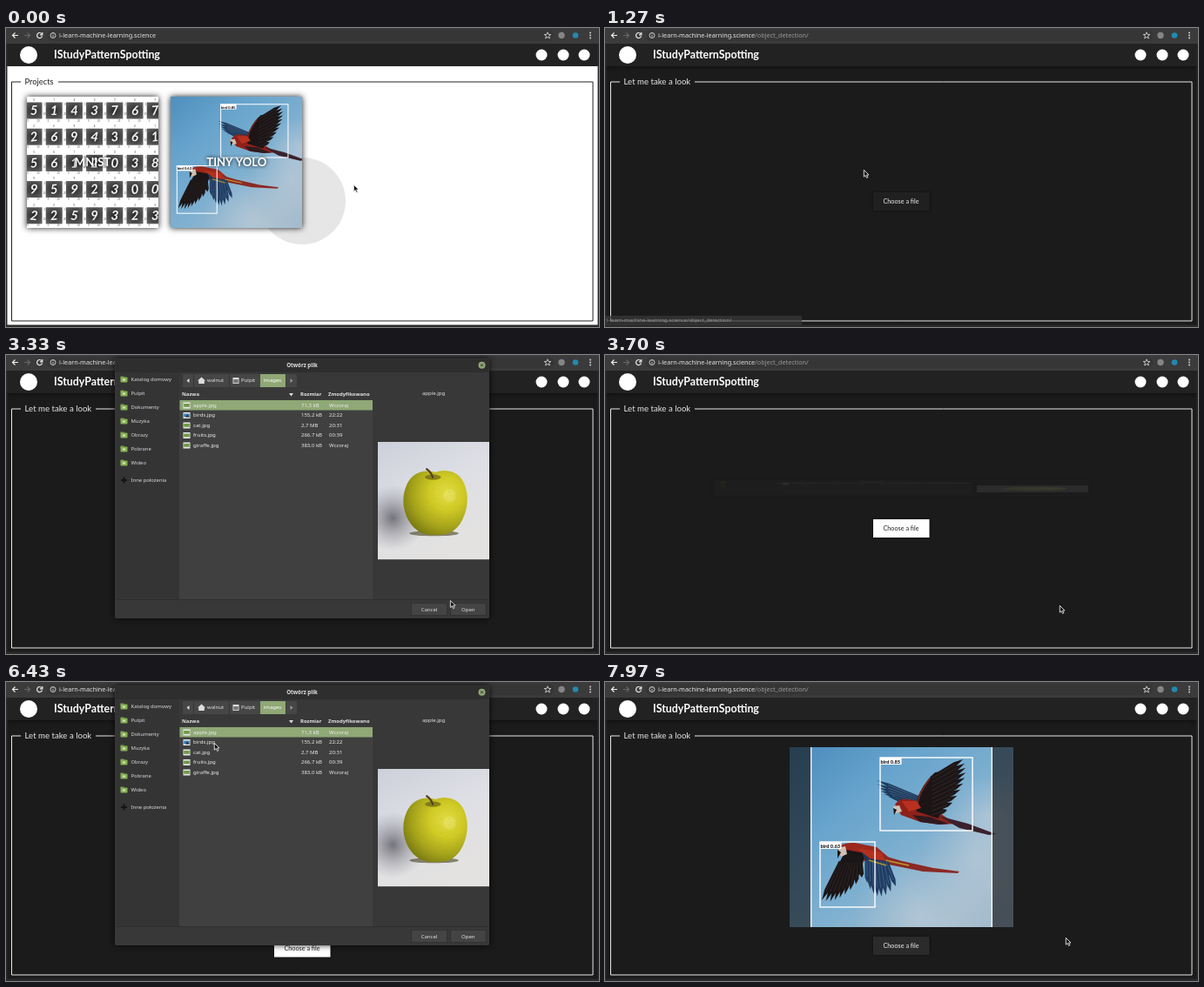
Recreate the animation shown at these times as an HTML page with a canvas. Size 681 by 344 pixels, loop 8 s.

```html
<!DOCTYPE html>
<html lang="en">
<head>
<meta charset="utf-8">
<title>Object detection demo</title>
<style>
html, body { margin: 0; width: 100%; height: 100%; overflow: hidden; background: #1b1b1b; }
canvas { display: block; }
</style>
</head>
<body>
<canvas id="stage" width="681" height="344"></canvas>
<script>
const ctx = document.getElementById('stage').getContext('2d');
const LOOP = 8000;
const LATO = 'Lato, sans-serif';
const NOTO = '"Noto Sans", sans-serif';
const GREEN = '#8fa876';

const clamp = v => Math.max(0, Math.min(1, v));
const ramp = (t, a, b) => clamp((t - a) / (b - a));
const ease = u => u * u * (3 - 2 * u);
const mix = (a, b, u) => a + (b - a) * u;
const grey = v => `rgb(${v},${v},${v})`;

function rect(x, y, w, h, color) {
  ctx.fillStyle = color;
  ctx.fillRect(x, y, w, h);
}
function rounded(x, y, w, h, r, color) {
  ctx.fillStyle = color;
  ctx.beginPath();
  ctx.roundRect(x, y, w, h, r);
  ctx.fill();
}
function oval(x, y, rx, ry, color) {
  ctx.fillStyle = color;
  ctx.beginPath();
  ctx.ellipse(x, y, rx, ry, 0, 0, Math.PI * 2);
  ctx.fill();
}
function disc(x, y, r, color) { oval(x, y, r, r, color); }
function shape(d, color) {
  ctx.fillStyle = color;
  ctx.fill(new Path2D(d));
}
function stroke(d, color, width = 1) {
  ctx.strokeStyle = color;
  ctx.lineWidth = width;
  ctx.stroke(new Path2D(d));
}
function text(s, x, y, size, color, { font = NOTO, weight = 400, align = 'left' } = {}) {
  ctx.font = `${weight} ${size}px ${font}`;
  ctx.textAlign = align;
  ctx.textBaseline = 'middle';
  ctx.fillStyle = color;
  ctx.fillText(s, x, y);
}
function withShadow(color, blur, draw) {
  ctx.save();
  ctx.shadowColor = color;
  ctx.shadowBlur = blur;
  draw();
  ctx.restore();
}
function withStops(g, colors) {
  colors.forEach((c, i) => g.addColorStop(i / (colors.length - 1), c));
  return g;
}
function gradient(x0, y0, x1, y1, ...colors) {
  return withStops(ctx.createLinearGradient(x0, y0, x1, y1), colors);
}
function radial(x, y, r, ...colors) {
  return withStops(ctx.createRadialGradient(x, y, 0, x, y, r), colors);
}
function local(x, y, scale, draw) {
  ctx.save();
  ctx.translate(x, y);
  ctx.scale(scale, scale);
  draw();
  ctx.restore();
}
function clipTo(x, y, w, h) {
  ctx.beginPath();
  ctx.rect(x, y, w, h);
  ctx.clip();
}

// Pictures

function detection(label, x, y, w, h, labelWidth) {
  ctx.strokeStyle = '#fff';
  ctx.lineWidth = 1.4;
  ctx.strokeRect(x, y, w, h);
  rect(x, y, labelWidth, 8, '#fff');
  text(label, x + .5, y + 4.8, 5.7, '#000', { font: LATO, weight: 700 });
}

function paintApple() {
  clipTo(0, 0, 208, 220);
  rect(0, 0, 208, 220, gradient(0, 0, 120, 220, '#cdd0da', '#dedfe5', '#e4e2e0'));
  rect(-50, 60, 160, 160, radial(28, 142, 62, 'rgba(60,58,66,.65)', 'rgba(90,90,98,.32)', 'rgba(120,120,130,0)'));
  oval(105, 171, 46, 5, 'rgba(70,65,30,.6)');
  shape('M107 57C124 50 148 54 158 72C172 96 169 130 153 154C140 172 124 175 107 174C86 176 68 166 58 148C44 124 44 92 60 70C72 54 93 52 107 57Z',
    radial(128, 96, 96, '#e2dc45', '#d0ca25', '#a5a31b', '#6b6c10'));
  oval(103, 66, 15, 5, 'rgba(80,75,10,.55)');
  stroke('M103 68Q100 56 90 50', '#594022', 3.4);
  oval(134, 101, 12, 12, 'rgba(240,236,150,.28)');
  for (let i = 0; i < 34; i++) {
    const a = i * 2.4, r = 8.2 * Math.sqrt(i);
    disc(108 + r * Math.cos(a), 118 + r * Math.sin(a), .6, 'rgba(150,105,20,.55)');
  }
}

// Feathers run from the line a-b to tips along the curve p-q-r.
function feathers(count, [ax, ay], [bx, by], [px, py], [qx, qy], [rx, ry], width, color, edge) {
  const curve = (p, q, r, u) => mix(mix(p, q, u), mix(q, r, u), u);
  for (let i = 0; i < count; i++) {
    const u = i / (count - 1);
    const x = mix(ax, bx, u), y = mix(ay, by, u);
    const tx = curve(px, qx, rx, u), ty = curve(py, qy, ry, u);
    const len = Math.hypot(tx - x, ty - y);
    const nx = (y - ty) / len * width, ny = (tx - x) / len * width;
    const mx = mix(x, tx, .75), my = mix(y, ty, .75);
    shape(`M${x + nx} ${y + ny}L${mx + nx} ${my + ny}L${tx} ${ty}L${mx - nx} ${my - ny}L${x - nx} ${y - ny}Z`, color);
    stroke(`M${x} ${y}L${mx} ${my}`, edge, .5);
  }
}

function paintBirds() {
  clipTo(-25, 0, 257, 207);
  rect(-25, 0, 257, 207, gradient(-25, 0, 150, 207, '#4a8abb', '#66a3cc', '#7fb0d0', '#a4bccd'));
  [[190, 130, 65], [125, 195, 75], [205, 80, 50]].forEach(([x, y, r]) =>
    rect(-25, 0, 257, 207, radial(x, y, r, 'rgba(196,208,219,.55)', 'rgba(190,205,218,0)')));

  shape('M126 60Q112 54 96 50L103 64L118 68Z', '#1d3655');
  feathers(8, [128, 60], [118, 67], [75, 38], [74, 54], [102, 62], 1.9, '#1e3a5c', '#6f95b5');
  shape('M96 66Q101 58 112 60L132 64L152 79L166 88L147 89L125 86L103 78Z', '#8f211a');
  shape('M116 78L135 80L158 88L147 89L125 86Z', '#2e1a20');
  shape('M146 79L180 88L212 100L204 101L170 93Z', '#3b222c');
  shape('M121 74C118 60 128 42 142 29L150 28L152 62L146 82Z', '#1b1516');
  feathers(10, [138, 36], [138, 78], [174, 14], [186, 34], [156, 72], 2.6, '#1b1516', '#4a3834');
  stroke('M121 70Q122 54 136 36', '#722319', 2);
  shape('M104 62L121 62L126 70L112 74Z', '#b8301f');
  shape('M94 68L101 67L104 74L97 76L94 74Z', '#cfc0b2');
  shape('M94 70L98 72L95 78Z', '#171310');

  shape('M30 117Q35 109 50 110L75 115L89 127L70 134L42 125Z', '#9c271c');
  shape('M80 124L104 131L140 139L170 143L168 145L128 143L84 134Z', '#8a2a24');
  stroke('M80 129L112 136', '#c09a2c', 1.6);
  shape('M40 118L62 122L56 146L38 150L24 148Z', '#1a1516');
  feathers(9, [34, 132], [56, 132], [12, 176], [30, 184], [58, 150], 2.6, '#1a1516', '#44342f');
  shape('M58 121L84 127L92 146L70 152Z', '#1e3556');
  feathers(8, [64, 130], [86, 132], [64, 156], [76, 186], [97, 160], 2.5, '#203c62', '#587da3');
  shape('M52 116L80 121L86 131L67 128Z', '#b3301e');
  stroke('M66 130L86 136', '#b08f2c', 1.6);
  shape('M30 116L39 114L41 123L34 126Z', '#cfc0b2');
  shape('M30 118L34 121L30 128Z', '#171310');
}

function birdBoxes() {
  detection('bird 0.85', 79, 12, 106, 84, 24.5);
  detection('bird 0.63', 10, 109, 63, 75, 24.5);
}

// Browser and page

function browserBar(onDetector) {
  rect(0, 0, 681, 18, '#3b3b3b');
  rounded(47, 2, 582, 13, 6, '#363636');
  stroke('M14 8.5H7.5M10.5 5.5L7.5 8.5L10.5 11.5', '#eee', 1.2);
  stroke('M21 8.5H27.5M24.5 5.5L27.5 8.5L24.5 11.5', '#666', 1.2);
  stroke('M41 6.7A3 3 0 1 0 41.5 9.3M41.8 5V7.8H39', '#eee', 1.2);
  stroke('M57 8.5A3 3 0 1 1 51 8.5A3 3 0 1 1 57 8.5M54 8V10.3M54 6.4V7.2', '#ddd', .9);
  const host = 'i-learn-machine-learning.science';
  text(host, 61, 8.7, 7.27, '#e6e6e6');
  if (onDetector) text('/object_detection/', 61 + ctx.measureText(host).width, 8.7, 7.27, '#9a9a9a');
  stroke('M622 4.8L623 7.4L625.8 7.5L623.6 9.2L624.4 12L622 10.4L619.6 12L620.4 9.2L618.2 7.5L621 7.4Z', '#ddd', .8);
  disc(638, 8.5, 3.7, '#858585');
  disc(654, 8.5, 3.3, '#2389ae');
  [5.5, 8.5, 11.5].forEach(y => disc(671, y, .9, '#ddd'));
}

function pageHeader(dark) {
  withShadow(`rgba(0,0,0,${.7 * dark})`, 6, () => rect(0, 18, 681, 26, '#222'));
  disc(26, 31, 10, '#fff');
  text('IStudyPatternSpotting', 55, 31.3, 12.4, '#fff', { font: LATO, weight: 700 });
  [615, 640, 664].forEach(x => disc(x, 31, 6.5, '#fff'));
}

function fieldset(legend, gapEnd, size, color) {
  stroke(`M17 62H6.5V337H674V62H${gapEnd}`, color);
  text(legend, 21.5, 62.3, size, color, { font: LATO });
}

function tileTitle(s, x) {
  withShadow('#000', 4, () => text(s, x, 155, 13.1, '#fff', { font: LATO, weight: 700, align: 'center' }));
}

function digitSheet() {
  ctx.save();
  clipTo(24, 79, 151, 151);
  rect(24, 79, 151, 151, '#fff');
  ['5143767', '2694361', '5612038', '9592300', '2259323'].forEach((row, j) => {
    [...row].forEach((digit, i) => {
      const x = 22.5 + 23.2 * i, y = 85.5 + 30.2 * j;
      rect(x, y, 19, 19, radial(x + 9.5, y + 9.5, 14, '#262626', '#6a6a6a'));
      ctx.save();
      ctx.translate(x + 9.5, y + 10);
      ctx.rotate(.12 * Math.sin(i * 3 + j * 5));
      text(digit, 0, 0, 15, '#f4f4f4', { font: LATO, weight: 'italic 700', align: 'center' });
      ctx.restore();
      text(digit, x + 9.5, y - 2.6, 3, '#333', { align: 'center' });
      text('0', x + 2, y + 21.3, 2.6, '#555');
      text('20', x + 13, y + 21.3, 2.6, '#555');
      text('0', x - 2, y + 3, 2.6, '#555');
      text('20', x - 3, y + 14, 2.6, '#555');
    });
  });
  ctx.restore();
}

function projectsPage() {
  rect(0, 18, 681, 326, '#fff');
  disc(340, 199, 50, '#e6e6e6');
  fieldset('Projects', 60, 9.4, '#222');
  [24, 189].forEach(x => withShadow('rgba(0,0,0,.9)', 7, () => rect(x, 79, 151, 151, '#555')));
  digitSheet();
  ctx.save();
  clipTo(189, 79, 151, 151);
  local(189, 79, 151 / 207, () => { paintBirds(); birdBoxes(); });
  ctx.restore();
  tileTitle('MNIST', 99.5);
  tileTitle('TINY YOLO', 264.8);
}

function chooseButton(y, white) {
  withShadow('rgba(0,0,0,.5)', 3, () => rect(308, y, 64.5, 21, grey(32 + 223 * white)));
  text('Choose a file', 340, y + 11, 7.25, white > .5 ? '#222' : '#f2f2f2', { font: LATO, align: 'center' });
}

function appleResult(boxed) {
  local(236, 72, 1, () => {
    paintApple();
    rect(0, 0, 208, 220, 'rgba(0,0,0,.18)');
    rect(0, 0, 208, 5.5, 'rgba(25,25,25,.72)');
    rect(0, 214.5, 208, 6, 'rgba(25,25,25,.72)');
    stroke('M0 6H208M0 214H208', '#fff', 1.3);
    if (boxed) detection('apple 0.73', 33, 51, 149, 127, 29);
  });
}

function birdsResult(boxed) {
  local(237, 75, 1, () => {
    paintBirds();
    rect(-25, 0, 25, 207, 'rgba(20,22,25,.65)');
    rect(207, 0, 25, 207, 'rgba(20,22,25,.65)');
    stroke('M-.3 0V207M207.3 0V207', '#fff', 1.3);
    if (boxed) birdBoxes();
  });
}

function detectorPage(t) {
  rect(0, 18, 681, 326, '#1b1b1b');
  fieldset('Let me take a look', 103, 9.65, '#e8e8e8');
  if (t < 4130) return chooseButton(189, ramp(t, 1750, 1930));
  if (t < 7900) {
    appleResult(t >= 4400);
    const white = t < 5000 ? 1 - ramp(t, 4130, 4300) : ramp(t, 5300, 5450);
    return chooseButton(295.5, white);
  }
  birdsResult(t >= 7960);
  chooseButton(293, t < 7960 ? .5 : .05);
}

function statusBar(alpha) {
  ctx.globalAlpha = alpha;
  rect(0, 331, 226, 11, '#383838');
  text('i-learn-machine-learning.science/object_detection/', 2, 336.7, 6.04, '#b5b5b5');
  ctx.globalAlpha = 1;
}

function windowEdge() {
  rect(0, 18, 1.5, 326, '#2a2a2a');
  rect(679.5, 18, 1.5, 326, '#2a2a2a');
  rect(0, 341.5, 681, 2.5, '#2a2a2a');
}

// File dialog

const PLACES = ['Katalog domowy', 'Pulpit', 'Dokumenty', 'Muzyka', 'Obrazy', 'Pobrane', 'Wideo'];
const FILES = [
  ['apple.jpg', '71,3 kB', 'Wczoraj'],
  ['birds.jpg', '155,2 kB', '22:22'],
  ['cat.jpg', '2,7 MB', '20:31'],
  ['fruits.jpg', '266,7 kB', '00:39'],
  ['giraffe.jpg', '383,0 kB', 'Wczoraj'],
];

function dialogButton(label, x, w) {
  rounded(x, 285, w, 15, 1.5, '#2c2c2c');
  rounded(x + .7, 285.7, w - 1.4, 13.6, 1, '#444');
  text(label, x + w / 2, 292.8, 6, '#e4e4e4', { align: 'center' });
}

function pathBar() {
  rounded(203, 22, 131, 15, 1.5, '#464646');
  rect(291, 22, 30.5, 15, GREEN);
  [215, 256, 291, 321].forEach(x => rect(x, 22, .8, 15, '#303030'));
  shape('M210.5 27L207.5 29.5L210.5 32Z', '#ddd');
  shape('M326.5 27L329.5 29.5L326.5 32Z', '#999');
  shape('M220 29.5L224.5 25.5L229 29.5H227.8V33H221.2V29.5Z', '#ddd');
  text('walnut', 231, 29.7, 6, '#e4e4e4');
  rect(260.5, 26, 7, 7, '#ddd');
  rect(261.3, 28, 5.4, 4.2, '#777');
  text('Pulpit', 270, 29.7, 6, '#e4e4e4');
  text('images', 306, 29.7, 6, '#fff', { align: 'center' });
}

function fileList(selected) {
  rect(199, 39, 222, 242, '#404040');
  rect(199, 39, 222, 12.5, '#383838');
  [['Nazwa', 202], ['Rozmiar', 338], ['Zmodyfikowano', 370]].forEach(([s, x]) =>
    text(s, x, 45.7, 5.95, '#e4e4e4', { weight: 700 }));
  shape('M325 44H330L327.5 47.5Z', '#ddd');
  rect(199.5, 52 + 11.5 * selected, 221.5, 11.5, GREEN);
  FILES.forEach(([name, size, date], i) => {
    const y = 58 + 11.5 * i;
    rect(203.5, y - 3.5, 8, 7, '#e8e8e8');
    rect(204.2, y - 2, 6.6, 3.8, i === 1 ? '#3b82b8' : '#6f9a43');
    if (i === 1) shape(`M206 ${y + 2}L208 ${y - 1}L211 ${y + 2}Z`, '#26394a');
    text(name, 215, y + .2, 6.1, '#ececec');
    text(size, 339, y + .2, 6, '#ececec');
    text(date, 371, y + .2, 6, '#ececec');
  });
}

function fileDialog(selected) {
  withShadow('rgba(0,0,0,.8)', 7, () => rounded(125, 4, 430, 299, 2, '#383838'));
  rounded(125.5, 4.5, 429, 15.5, 2, '#2e2e2e');
  text('Otwórz plik', 340, 12.3, 6.2, '#e4e4e4', { weight: 700, align: 'center' });
  disc(546.5, 11.7, 4, GREEN);
  stroke('M545 10.2L548 13.2M548 10.2L545 13.2', '#2e2e2e', 1);
  rect(126, 20, 73, 261, '#343434');
  PLACES.forEach((name, i) => {
    const y = 28 + 16 * i;
    rect(131.5, y - 3.5, 4, 2, '#6f9a43');
    rounded(131.5, y - 2.5, 8, 6, .8, '#86b052');
    rect(134, y - .5, 3, 2, '#d8e6c4');
    text(name, 143.5, y + .2, 5.9, '#dcdcdc');
  });
  stroke('M132 144H139M135.5 140.5V147.5', '#151515', 2.2);
  text('Inne położenia', 143.5, 144.2, 5.9, '#dcdcdc');
  pathBar();
  fileList(selected);
  text(FILES[selected][0], 491, 44.2, 6, '#e4e4e4', { align: 'center' });
  if (selected === 0) local(427, 100, 128 / 208, paintApple);
  else local(427 + 25 * 128 / 257, 116.5, 128 / 257, paintBirds);
  rect(126, 281, 429, .8, '#2c2c2c');
  dialogButton('Cancel', 465, 42);
  dialogButton('Open', 510, 41.5);
}

function squashedDialog(selected, height, alpha) {
  ctx.save();
  ctx.globalAlpha = alpha;
  ctx.translate(0, 153);
  ctx.scale(1, height);
  ctx.translate(0, -153);
  fileDialog(selected);
  ctx.restore();
}

function dialogAt(t) {
  if (t >= 2070 && t < 2200) squashedDialog(0, .9, .6);
  else if (t >= 2200 && t < 3700) fileDialog(0);
  else if (t >= 3700 && t < 4130) squashedDialog(0, .06, .08);
  else if (t >= 5560 && t < 7430) {
    const open = ramp(t, 5530, 5700);
    if (open < 1) squashedDialog(0, .7 + .3 * open, open);
    else fileDialog(t < 6730 ? 0 : 1);
  } else if (t >= 7430 && t < 7700) {
    const gone = ramp(t, 7400, 7500);
    squashedDialog(1, 1 - .33 * gone, 1 - .6 * gone);
  }
}

// Pointer

const POINTER = [
  [330, 399, 180], [600, 296, 155], [1240, 296, 155], [1270, 297, 163],
  [1620, 385, 202], [1930, 325, 193], [2770, 325, 193], [3430, 522, 288],
  [4130, 522, 288], [4330, 540, 296], [4630, 462, 305], [4780, 462, 305],
  [5100, 369, 302], [5300, 369, 302], [5420, 360, 303], [5560, 360, 303],
  [6070, 242, 84], [6110, 242, 84], [6430, 239, 70], [7050, 239, 70],
  [7380, 529, 294],
];

function pointer(t) {
  let [, x, y] = POINTER[0];
  for (let i = 1; i < POINTER.length; i++) {
    const [t0, x0, y0] = POINTER[i - 1], [t1, x1, y1] = POINTER[i];
    if (t < t0) break;
    const u = ease(ramp(t, t0, t1));
    x = mix(x0, x1, u);
    y = mix(y0, y1, u);
  }
  local(x, y, 1, () => {
    const arrow = 'M.3 .3V8.2L2.2 6.5L3.5 9.4L4.9 8.8L3.6 6H6Z';
    shape(arrow, '#111');
    stroke(arrow, '#e8e8e8', .9);
  });
}

function render(t) {
  const dark = ramp(t, 640, 800);
  if (dark < 1) projectsPage();
  if (dark > 0) {
    ctx.globalAlpha = dark;
    detectorPage(t);
    ctx.globalAlpha = 1;
  }
  pageHeader(dark);
  browserBar(dark > 0);
  windowEdge();
  if (t >= 530 && t < 1450) statusBar(t < 1230 ? 1 : .75 * (1 - ramp(t, 1270, 1450)));
  dialogAt(t);
  pointer(t);
}

function tick(now) {
  render(now % LOOP);
  requestAnimationFrame(tick);
}
render(0);
requestAnimationFrame(tick);
</script>
</body>
</html>
```
